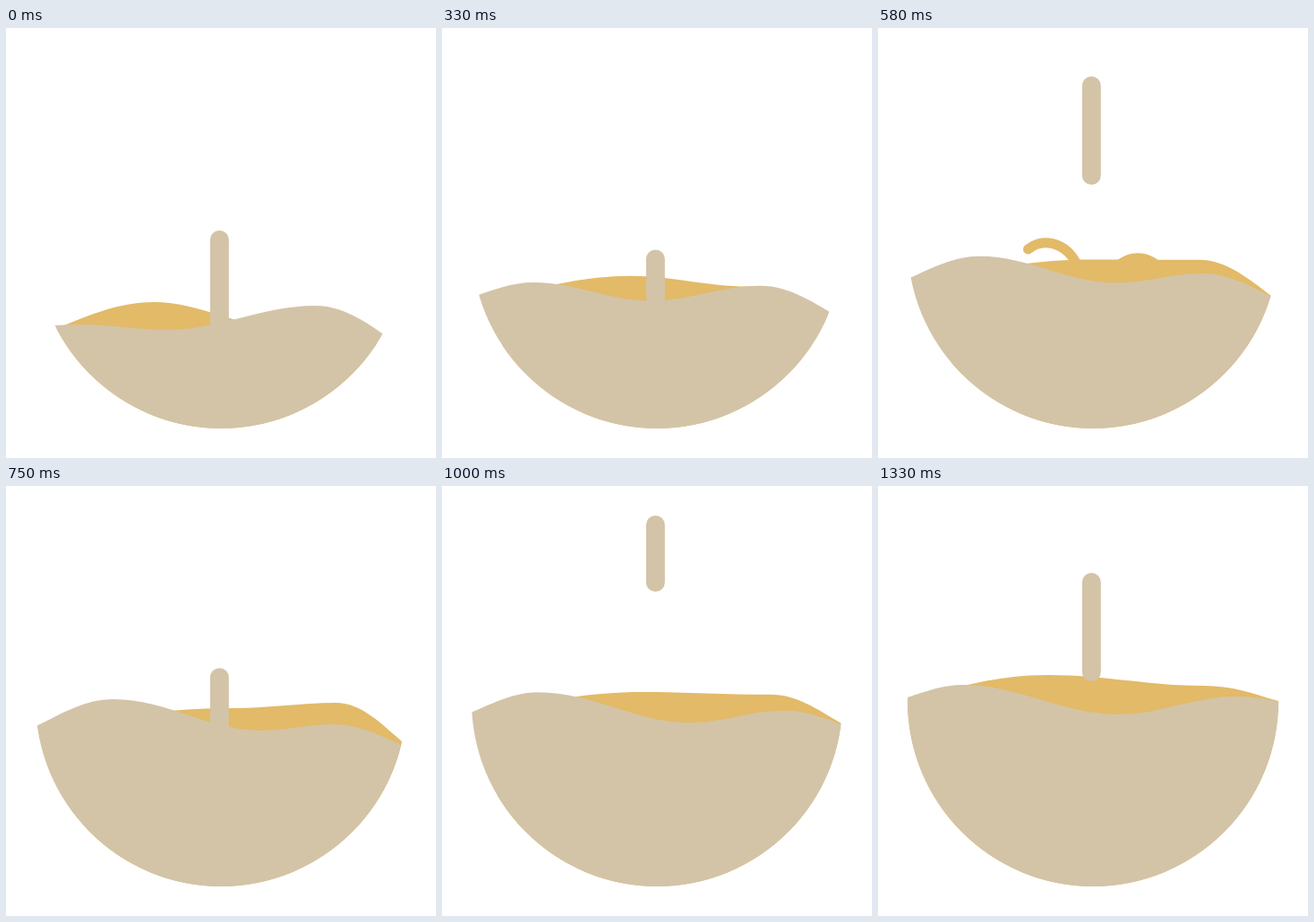
An HTML page with a canvas that plays this animation: 480 px wide and 480 px high, repeating every 1.41 s.

```html
<!DOCTYPE html>
<html lang="en">
<head>
<meta charset="utf-8">
<title>Filling bowl</title>
<style>
  html, body { margin: 0; height: 100%; overflow: hidden; background: #fff; }
  canvas { display: block; }
</style>
</head>
<body>
<canvas id="stage" width="480" height="480"></canvas>
<script>
const ctx = document.getElementById('stage').getContext('2d');
const LOOP = 1410, FPS = 12, MIDDLE = 9, LAST = 16, SPLASH = 7;
const TAN = '#d3c4a8', GOLD = '#e2ba68';
const BAR = { x: 238.3, top: 33, length: 121, width: 21 };

// Each surface morphs through three poses; inner points are crests and troughs.
const FRONT = [
  [[30, 334], [85, 331], [180, 337], [345, 310], [450, 362]],
  [[30, 270], [120, 238], [285, 273], [365, 266], [450, 293]],
  [[30, 237], [95, 222], [268, 255], [400, 235], [450, 241]],
];
const BACK = [
  [[45, 340], [165, 306], [315, 336], [425, 355]],
  [[90, 260], [255, 248], [368, 242], [452, 294]],
  [[33, 238], [190, 211], [365, 223], [450, 241]],
];

// Fast drops strobe and seem to climb: first step, last step, top at each.
const CLIMBS = [[0, 2, 226, 33], [3, 7, 312, 54], [8, 12, 272, -3], [13, LAST, 290, 97]];

const lerp = (a, b, t) => a + (b - a) * t;

function surfaceAt(poses, step) {
  const late = step > MIDDLE;
  const u = late ? (step - MIDDLE) / (LAST - MIDDLE) : step / MIDDLE;
  const eased = u * (1.25 - 0.25 * u);
  const [from, to] = late ? poses.slice(1) : poses;
  return from.map(([x, y], i) => [lerp(x, to[i][0], eased), lerp(y, to[i][1], eased)]);
}

function fillBelow(points, color) {
  const last = points.length - 1;
  ctx.beginPath();
  ctx.moveTo(points[0][0], 480);
  ctx.lineTo(...points[0]);
  for (let i = 0; i < last; i++) {
    const [x0, y0] = points[i], [x1, y1] = points[i + 1];
    // Level at crests and troughs, sloped at the rim.
    const leaveY = i === 0 ? lerp(y0, y1, 0.5) : y0;
    const arriveY = i === last - 1 ? lerp(y1, y0, 0.5) : y1;
    ctx.bezierCurveTo(lerp(x0, x1, 0.36), leaveY, lerp(x0, x1, 0.64), arriveY, x1, y1);
  }
  ctx.lineTo(points[last][0], 480);
  ctx.fillStyle = color;
  ctx.fill();
}

function strokeRound(color, width, trace) {
  ctx.strokeStyle = color;
  ctx.lineWidth = width;
  ctx.lineCap = 'round';
  ctx.beginPath();
  trace();
  ctx.stroke();
}

function drawSplash() {
  strokeRound(GOLD, 11, () => {
    ctx.moveTo(167.5, 247);
    ctx.bezierCurveTo(183, 234, 209, 238, 222, 264);
  });
  ctx.fillStyle = GOLD;
  ctx.beginPath();
  ctx.moveTo(262, 264);
  ctx.bezierCurveTo(278, 247, 303, 247, 319, 265);
  ctx.fill();
}

function drawBar(step) {
  const [start, end, low, high] = CLIMBS.find(climb => step <= climb[1]);
  const top = lerp(low, high, (step - start) / (end - start));
  const cap = BAR.width / 2;
  strokeRound(TAN, BAR.width, () => {
    ctx.moveTo(BAR.x, Math.max(top, BAR.top) + cap);
    ctx.lineTo(BAR.x, top + BAR.length - cap);
  });
}

function draw(step) {
  ctx.fillStyle = '#fff';
  ctx.fillRect(0, 0, 480, 480);
  ctx.save();
  ctx.beginPath();
  ctx.arc(240, 240, 207, 0, Math.PI * 2);
  ctx.clip();
  fillBelow(surfaceAt(BACK, step), GOLD);
  if (step === SPLASH) drawSplash();
  fillBelow(surfaceAt(FRONT, step), TAN);
  ctx.restore();
  drawBar(step);
}

function tick() {
  const time = performance.now() % LOOP;
  draw(Math.min(LAST, Math.floor((time + 3.4) * FPS / 1000)));
  requestAnimationFrame(tick);
}
tick();
</script>
</body>
</html>
```
